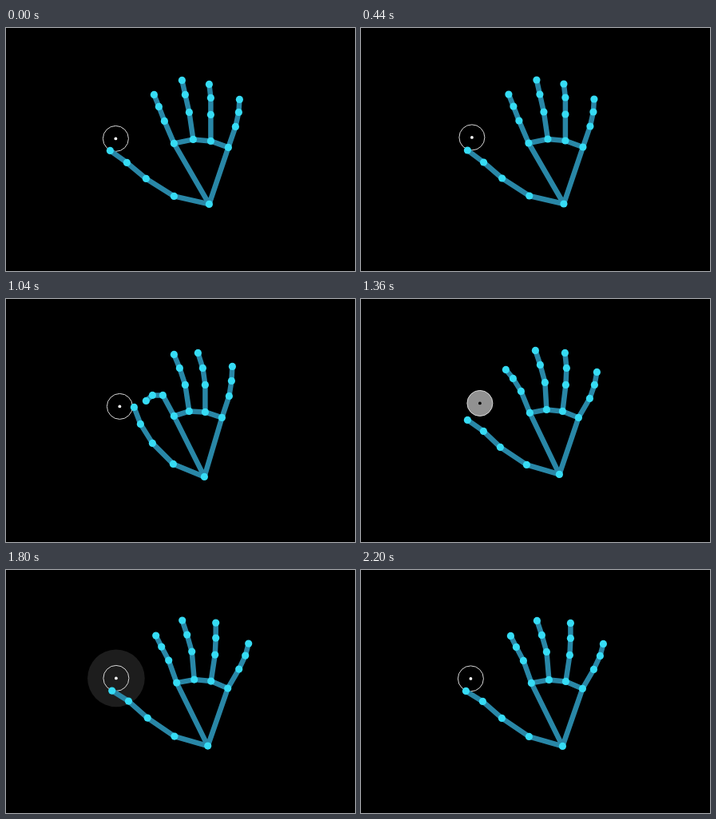
Recreate the animation shown at these times as an HTML page with a canvas. Size 437 by 304 pixels, loop 2.24 s.

```html
<!DOCTYPE html>
<html lang="en">
<head>
<meta charset="utf-8">
<title>Hand pinch</title>
<style>
  html, body { margin: 0; width: 100%; height: 100%; overflow: hidden; background: #000; }
  canvas { display: block; }
</style>
</head>
<body>
<canvas id="stage" width="437" height="304"></canvas>
<script>
const ctx = document.getElementById('stage').getContext('2d');
const LOOP = 2240, STEP = 40;

// Each pose: wrist, then four joints per finger from thumb to little finger.
const open = [254,220, 210,210, 175,188, 151,168, 130,153,
  210,144, 198,116, 191,98, 185,83,  234,139, 229,105, 224,83, 220,65,
  256,141, 256,108, 256,87, 254,70,  278,149, 287,123, 291,105, 292,89];
const pinch = [248,222, 209,206, 183,180, 168,156, 160,135,
  210,146, 196,120, 183,120, 175,127,  229,140, 224,107, 217,86, 210,69,
  249,141, 249,107, 246,86, 240,67,  270,148, 279,121, 282,102, 283,84];
const release = [248,219, 207,207, 174,185, 153,165, 133,151,
  211,142, 200,115, 190,99, 181,88,  232,138, 230,104, 224,82, 218,64,
  252,140, 256,107, 257,86, 255,67,  272,148, 286,124, 292,107, 295,91];
const relax = [252,220, 210,208, 176,185, 152,164, 131,151,
  213,141, 203,113, 194,96, 187,82,  235,137, 232,102, 226,81, 220,63,
  256,139, 261,106, 262,85, 262,66,  277,148, 291,124, 299,107, 303,92];

const mix = (a, b, k) => a.map((v, i) => v + (b[i] - v) * k);

// Shift the hand; the thumb gets an extra push that grows toward its tip.
const nudge = (pose, dx, dy, thumb = 0) => pose.map((v, i) =>
  i % 2 ? v + dy : v + dx + (i < 10 ? thumb * i / 8 : 0));

const ready = nudge(open, 0.4, -1, 3);
const hand = [
  [0, open],
  [440, nudge(open, -0.5, -0.4, 3.5)],
  [760, ready],
  [880, ready],
  [1040, pinch],
  [1120, mix(ready, pinch, 1.25)],
  [1200, mix(ready, pinch, 1.25)],
  [1360, release],
  [1720, nudge(relax, 0.3, -0.3, 1)],
  [1800, nudge(relax, 0.3, -0.3, 1)],
  [2200, relax]
];
const cursor = [
  [0, [137, 138]], [440, [138.5, 136.5]], [760, [139.5, 136]],
  [1040, [142, 134]], [1240, [149, 130]], [1360, [148.5, 130]],
  [1800, [137.5, 135]], [2200, [137, 135.5]]
];

function at(keys, t) {
  const n = keys.findIndex(k => k[0] > t);
  if (n < 0) return keys[keys.length - 1][1];
  const [t0, a] = keys[n - 1], [t1, b] = keys[n];
  return mix(a, b, (t - t0) / (t1 - t0));
}

function disc(x, y, r, color) {
  ctx.fillStyle = color;
  ctx.beginPath();
  ctx.arc(x, y, r, 0, Math.PI * 2);
  ctx.fill();
}

function drawCursor(t) {
  const [x, y] = at(cursor, t);
  const pressed = t >= 1120 && t < 1440;
  const u = Math.min(1, Math.max(0, (t - 1360) / 640));
  if (t >= 1120 && u < 1) {
    const radius = 16 + 22 * u * (2 - u);
    disc(x, y, radius, `rgba(255,255,255,${0.57 * (1 - u) ** 1.4})`);
  }
  ctx.strokeStyle = '#d8d8d8';
  ctx.lineWidth = 1;
  ctx.beginPath();
  ctx.arc(x, y, 16, 0, Math.PI * 2);
  ctx.stroke();
  disc(x, y, 1.9, pressed ? '#000' : '#fff');
}

const bones = [[0, 1, 2, 3, 4], [5, 6, 7, 8], [9, 10, 11, 12],
  [13, 14, 15, 16], [17, 18, 19, 20], [0, 5, 9, 13, 17, 0]];

function drawHand(t) {
  const p = at(hand, t);
  ctx.strokeStyle = '#2987a7';
  ctx.lineWidth = 6.5;
  ctx.lineJoin = 'round';
  for (const chain of bones) {
    ctx.beginPath();
    chain.forEach(j => ctx.lineTo(p[2 * j], p[2 * j + 1]));
    ctx.stroke();
  }
  for (let i = 0; i < p.length; i += 2) disc(p[i], p[i + 1], 4.6, '#36dcf5');
}

const start = performance.now();
function frame() {
  const t = Math.floor((performance.now() - start) % LOOP / STEP) * STEP;
  ctx.fillStyle = '#000';
  ctx.fillRect(0, 0, 437, 304);
  ctx.save();
  ctx.translate(0.4, 0.4);
  drawCursor(t);
  drawHand(t);
  ctx.restore();
  requestAnimationFrame(frame);
}
frame();
</script>
</body>
</html>
```
